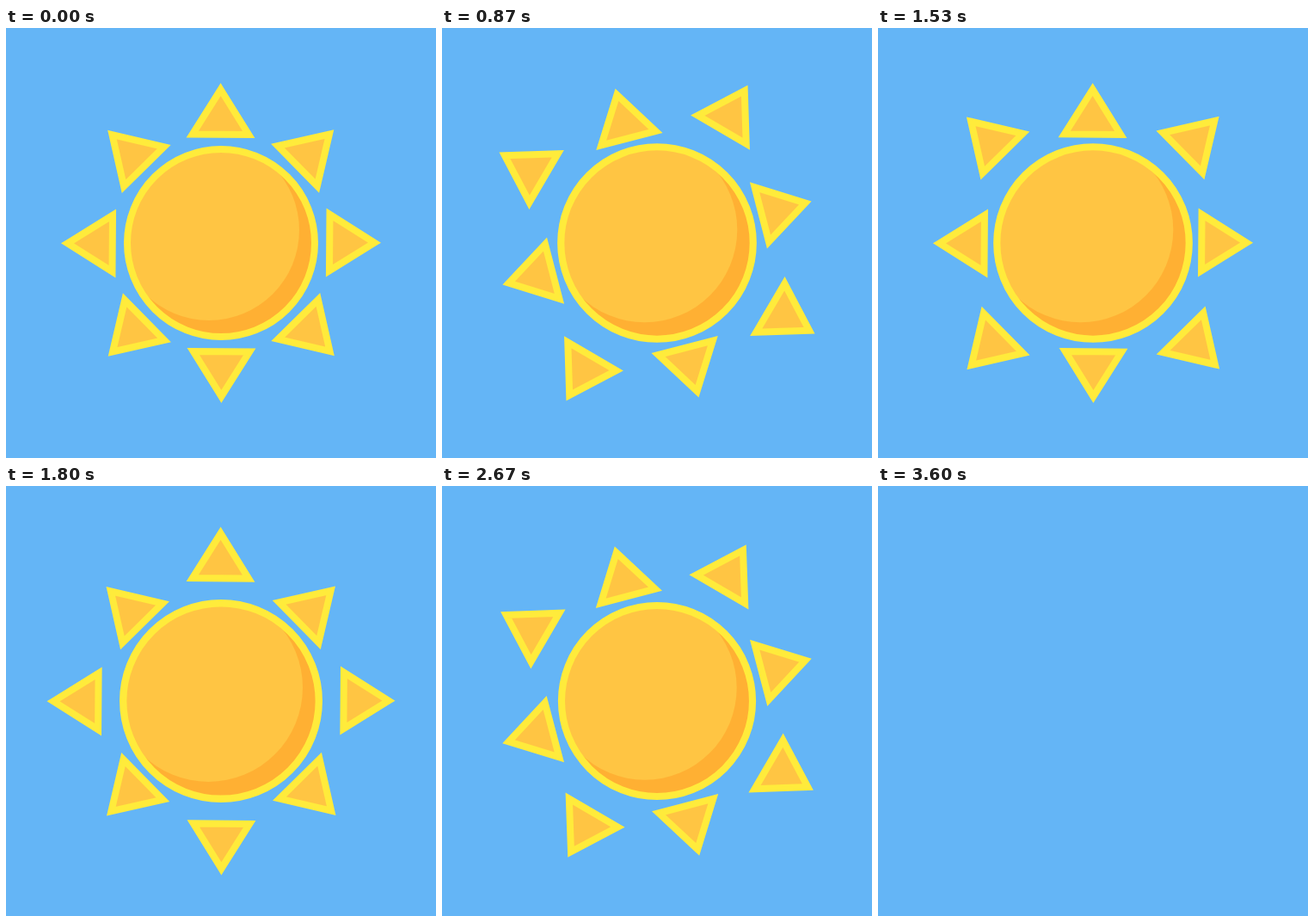
Recreate the animation shown at these times as an HTML page. Size 500 px wide and 500 px high, loop 3630 ms.

```html
<!DOCTYPE html>
<html lang="en">
<head>
<meta charset="utf-8">
<title>Sun</title>
<style>
  html, body { margin: 0; width: 100%; height: 100%; overflow: hidden; background: #64b5f6; }
  svg { display: block; width: 100%; height: 100%; }
</style>
</head>
<body>
<svg viewBox="-250 -250 500 500">
  <defs>
    <clipPath id="face"><circle r="109"/></clipPath>
    <path id="ray" d="M-.4-178.5 32.2-126-33.2-126.5Z"/>
  </defs>
  <g id="sun" stroke="#ffeb3b" stroke-width="8" fill="#ffc543">
    <g id="rays"></g>
    <g id="disc">
      <circle r="109" fill="#ffb033" stroke="none"/>
      <circle r="105" cx="-14" cy="-15" stroke="none" clip-path="url(#face)"/>
      <circle r="109" fill="none"/>
    </g>
  </g>
</svg>
<script>
const STEP = 30, STEPS = 121, REACH = 25.7, SWING = 30;
const byId = id => document.getElementById(id);
const sun = byId('sun'), disc = byId('disc'), rayGroup = byId('rays');

const rays = Array.from({ length: 8 }, () => {
  const ray = document.createElementNS('http://www.w3.org/2000/svg', 'use');
  ray.setAttribute('href', '#ray');
  return rayGroup.appendChild(ray);
});

const smooth = x => {
  x = Math.min(1, Math.max(0, x));
  return x * x * (3 - 2 * x);
};

// Switches smoothly between 0 and 1; each move is [start, length] in steps.
const toggle = (n, ...moves) =>
  moves.reduce((sum, [start, length], i) =>
    sum + (i % 2 ? -1 : 1) * smooth((n - start) / length), 0);

function draw(n) {
  sun.style.display = n < STEPS - 1 ? '' : 'none';

  const phase = n % 40 / 20;
  const pulse = smooth(phase < 1 ? phase : 2 - phase);
  disc.setAttribute('transform', `scale(${1 + 0.044 * pulse})`);

  const angle = SWING * toggle(n, [0, 29], [30, 21], [66, 21.5], [88, 21]);
  const straight = REACH * toggle(n, [0, 17.5], [30.5, 16], [50.5, 16], [86, 16]);
  const diagonal = REACH * toggle(n, [31.3, 16], [47, 16], [88, 15], [103, 15]);
  rays.forEach((ray, i) => {
    const offset = i % 2 ? diagonal : straight;
    ray.setAttribute('transform', `rotate(${angle + 45 * i}) translate(0 ${-offset})`);
  });
}

function tick() {
  draw(Math.floor(performance.now() / STEP) % STEPS);
  requestAnimationFrame(tick);
}
tick();
</script>
</body>
</html>
```
